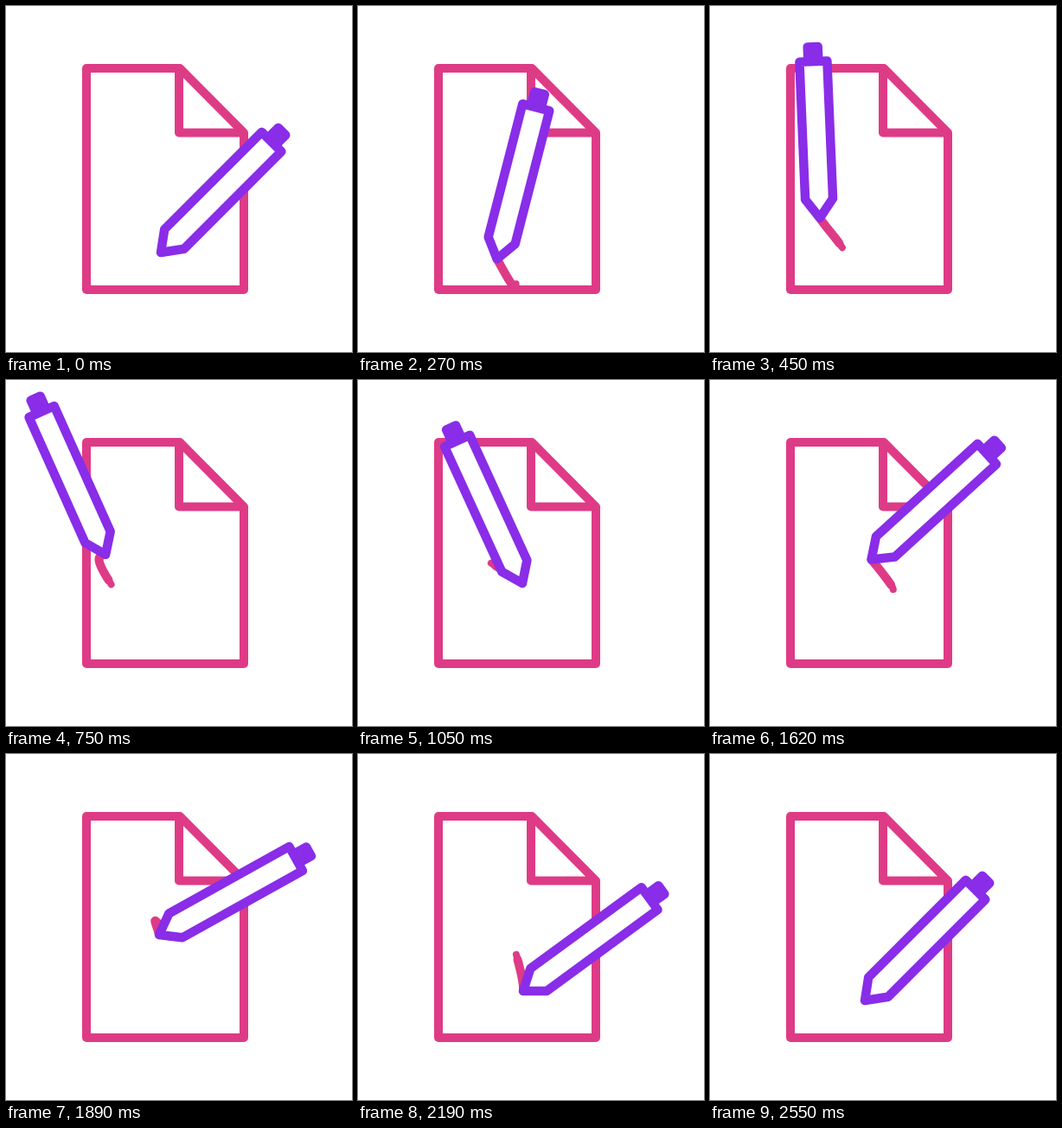
An HTML page for the animation above (4610 ms loop, 400 px wide and 400 px high).

```html
<!DOCTYPE html>
<html lang="en">
<head>
<meta charset="utf-8">
<title>Writing pen</title>
<style>
  html, body { margin: 0; width: 100%; height: 100%; overflow: hidden; background: #fff; }
  svg { display: block; width: 100%; height: 100%; }
  path, polyline { stroke-width: 10; stroke-linejoin: round; stroke-linecap: round; }
  .pink { fill: none; stroke: #de3b86; }
  .thin { stroke-width: 8; }
  #pen path { stroke: #892de8; stroke-width: 10.5; }
  .body { fill: #fff; }
  .cap { fill: #892de8; }
</style>
</head>
<body>
<svg viewBox="0 0 400 400">
  <path class="pink" d="M93 72H201L275 146.5V328H93ZM200 72V146.5H275"/>
  <polyline class="pink thin" id="tail"/>
  <polyline class="pink" id="ink"/>
  <g id="pen">
    <path class="cap" d="M-6 -198H6V-182H-6Z"/>
    <path class="body" d="M0 0L-16 -22V-181H16V-22Z"/>
  </g>
</svg>
<script>
const LOOP = 4610, STEP = 30, END = 2550;

// turning points of the scribble: time, tip x, tip y, lean in degrees
const turns = [
  [0, 179, 285, 45],
  [165, 181, 325, 27],
  [310, 152, 278, 10],
  [450, 127, 245, -2.4],
  [680, 108, 205, -22],
  [900, 146, 208, -24.6],
  [1050, 190, 235, -24.6],
  [1230, 209, 247, -3],
  [1380, 210, 238, 27.8],
  [1770, 173, 193, 57],
  [1890, 177, 209, 60.9],
  [2190, 191, 274, 53.8],
  [2410, 171, 281, 46],
  [END, 179, 285, 45]
];

function slope(i, c) {
  const a = turns[i - 1], b = turns[i + 1];
  return a && b ? (b[c] - a[c]) / (b[0] - a[0]) : 0;
}

// smooth curve through the turning points
function pose(t) {
  let i = 0;
  while (i < turns.length - 2 && t > turns[i + 1][0]) i++;
  const a = turns[i], b = turns[i + 1];
  const d = b[0] - a[0], u = (t - a[0]) / d, v = 1 - u;
  return [1, 2, 3].map(c =>
    v * v * (1 + 2 * u) * a[c] + u * u * (3 - 2 * u) * b[c] +
    d * u * v * (v * slope(i, c) - u * slope(i + 1, c)));
}

// the last stretch of the tip's path, no longer than reach
function trail(t, reach) {
  let [x, y] = pose(t), points = `${x},${y}`;
  for (let s = t - 4; s >= 0 && reach > 0; s -= 4) {
    const [px, py] = pose(s);
    const len = Math.hypot(px - x, py - y) || 1e-6;
    const part = Math.min(1, reach / len);
    x += (px - x) * part;
    y += (py - y) * part;
    points += ` ${x.toFixed(2)},${y.toFixed(2)}`;
    reach -= len;
  }
  return points;
}

const [tail, ink, pen] = ["tail", "ink", "pen"].map(id => document.getElementById(id));

function draw(time) {
  const t = Math.min(END, Math.floor((time % LOOP) / STEP) * STEP);
  const [x, y, lean] = pose(t);
  const fade = Math.min(1, (END - t) / 360);
  tail.setAttribute("points", trail(t, 43 * fade));
  ink.setAttribute("points", trail(t, 37 * fade));
  pen.setAttribute("transform", `translate(${x} ${y}) rotate(${lean})`);
}

const origin = performance.now();
function tick() {
  draw(performance.now() - origin);
  requestAnimationFrame(tick);
}
draw(0);
requestAnimationFrame(tick);
</script>
</body>
</html>
```
